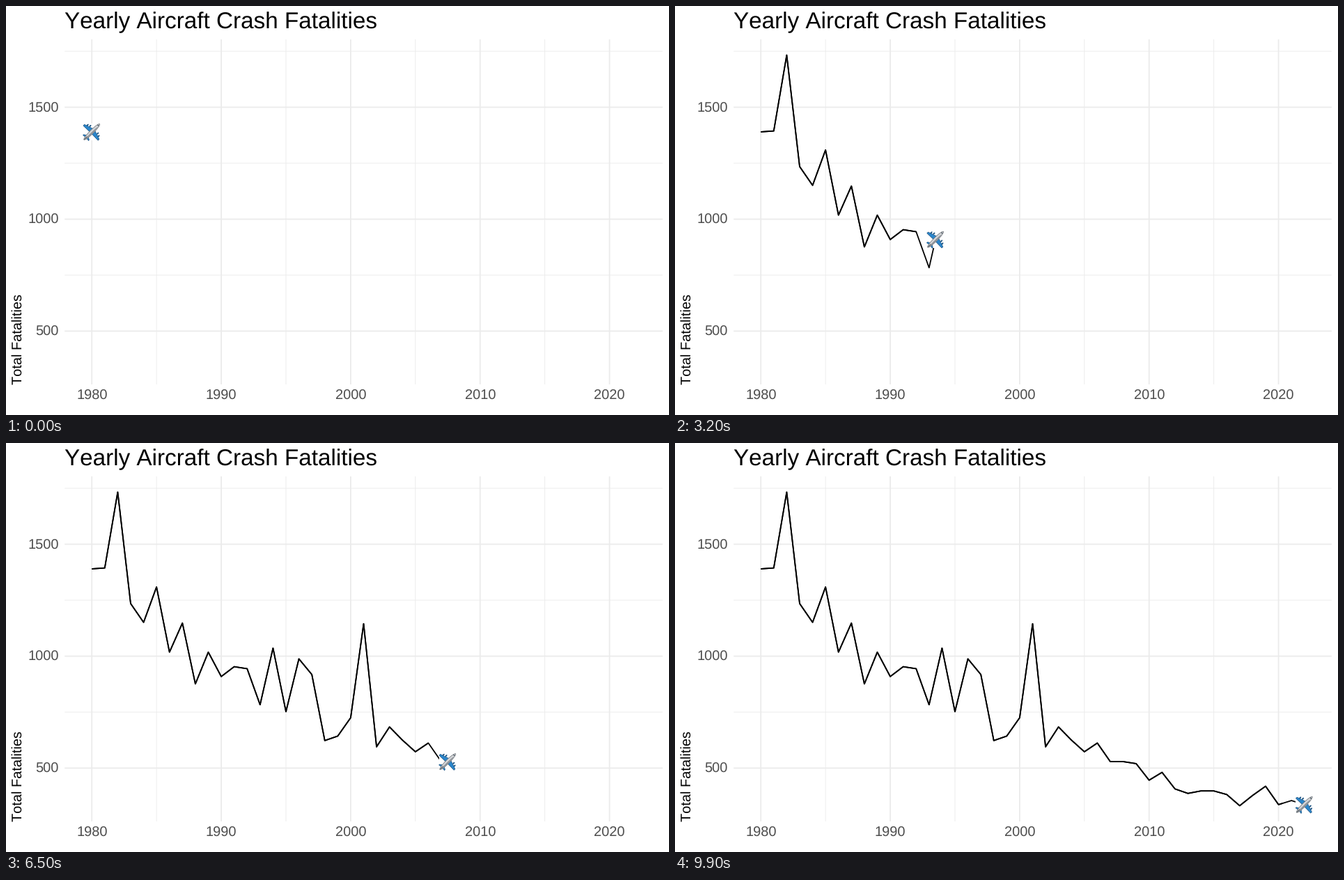
A matplotlib script that plays this animation: 952x588 px, repeating every 10000 ms.

```python
import numpy as np
import matplotlib.pyplot as plt
from matplotlib.animation import FuncAnimation
from matplotlib.collections import LineCollection
from matplotlib.patches import Ellipse, Polygon, Rectangle
from matplotlib.transforms import Affine2D

W, H, DPI = 952, 588, 64
PX = 72 / DPI  # points per pixel
FRAMES = 100
LAG = 4        # frames until the trail reaches full weight

plt.rcParams.update({
    "font.family": "Liberation Sans",
    "text.hinting": "none",
    "text.kerning_factor": 6,  # plain advances, no pair kerning
    "toolbar": "None",
})

LEFT, RIGHT, TOP, BOTTOM = 84.2, 942.8, 48.0, 544.0
START, END = 1980, 2022

# The plotted series, one value per year
deaths = np.array([
    1390, 1394, 1733, 1235, 1151, 1309, 1018, 1148, 876, 1018, 909,
    953, 944, 783, 1036, 752, 988, 918, 623, 643, 725, 1145, 595, 684,
    625, 573, 612, 529, 529, 520, 446, 481, 407, 387, 398, 398, 382,
    332, 378, 419, 337, 355, 337])
years = np.arange(START, END + 1)


def rescale(v, lo, hi, a, b):
    """Map v to pixels a..b, with the data range padded by 5 % each side."""
    pad = 0.05 * (hi - lo)
    return a + (v - lo + pad) / (hi - lo + 2 * pad) * (b - a)


def px(year):
    return rescale(year, START, END, LEFT, RIGHT)


def py(value):
    return rescale(value, deaths.min(), deaths.max(), BOTTOM, TOP)


# Each year is reached on a whole frame, with straight travel in between
keys = np.round((years - START) * (FRAMES - 1) / (END - START))
steps = np.arange(FRAMES)
track = np.column_stack([np.interp(steps, keys, px(years)),
                         np.interp(steps, keys, py(deaths))])

fig = plt.figure(figsize=(W / DPI, H / DPI), dpi=DPI, facecolor="white")
ax = fig.add_axes([0, 0, 1, 1])
ax.set(xlim=(0, W), ylim=(H, 0))
ax.axis("off")


def grid(xs, ys, width):
    style = dict(color="#ebebeb", lw=width * PX, snap=False,
                 solid_capstyle="butt", zorder=1)
    for y in ys:
        ax.plot([LEFT, RIGHT], [py(y)] * 2, **style)
    for x in xs:
        ax.plot([px(x)] * 2, [TOP, BOTTOM], **style)


def label(x, y, text, size, color="black", rotation=0):
    ax.text(x, y, text, fontsize=size * PX, color=color, rotation=rotation,
            ha="left", va="baseline", rotation_mode="anchor")


x_ticks, y_ticks = range(1980, 2021, 10), range(500, 1501, 500)
grid(range(1985, 2020, 10), range(750, 1751, 500), 0.89)
grid(x_ticks, y_ticks, 1.78)

SIZE, GREY = 20, "#4d4d4d"
DIGIT = 0.556 * SIZE
for year in x_ticks:
    label(px(year) - 2 * DIGIT, 566, str(year), SIZE, GREY)
for value in y_ticks:
    text = str(value)
    label(76 - len(text) * DIGIT, py(value) + 6.8, text, SIZE, GREY)
label(LEFT, 32, "Yearly Aircraft Crash Fatalities", 33.2)
label(23, BOTTOM, "Total Fatalities", SIZE, rotation=90)

trail = LineCollection([], colors="black", linewidths=1.78 * PX,
                       capstyle="butt", joinstyle="round", zorder=2)
ax.add_collection(trail, autolim=False)

# Plane icon: drawn nose to the right about its centre, then turned up 45°
pose = Affine2D()
BLUE, NAVY, SILVER, SHADE = "#2a86cc", "#1d5482", "#d3d5d8", "#8b9096"


def add(patch, z):
    patch.set(transform=pose + ax.transData, zorder=z)
    ax.add_patch(patch)


def oval(x, y, w, h, fill, z, edge="none"):
    add(Ellipse((x, y), w, h, fc=fill, ec=edge, lw=0.7 * PX), z)


def wing(root, chord, sweep, span, side):
    """Swept, tapering surface reaching out from the fuselage."""
    tip = root - sweep
    pts = [(root, 0), (tip, side * span),
           (tip - chord / 3, side * span), (root - chord, 0)]
    add(Polygon(pts, fc=BLUE, ec=NAVY, lw=0.7 * PX, joinstyle="round"), 5)


add(Rectangle((-12.3, -12.3), 24.6, 24.6, angle=45,
              rotation_point="center", fc="white", ec="none"), 3)
for side in (-1, 1):
    wing(5, 7, 5, 15, side)
    wing(-7.5, 4, 3.5, 5.5, side)
    for k in (1, 2):
        oval(6.2 - 1.8 * k, side * (4 + 3.6 * k), 3.8, 2, NAVY, 4)
oval(0, 0, 32, 5.4, SILVER, 6, "#6b7177")
oval(-2, 1.2, 26, 2, SHADE, 7)
oval(-12.5, 0, 7, 1.4, "#5f666d", 8)
oval(13, 0, 1.6, 2.6, "#4a5660", 8)


def update(n):
    # The lagging second stroke gives the older part its heavier edge
    trail.set_segments([track[:k + 1] for k in (n, n - LAG) if k > 0])
    pose.clear().rotate_deg(-45).translate(*track[n])
    return ()


anim = FuncAnimation(fig, update, frames=FRAMES, interval=100, repeat=True,
                     repeat_delay=0, blit=False)
plt.show()
```
